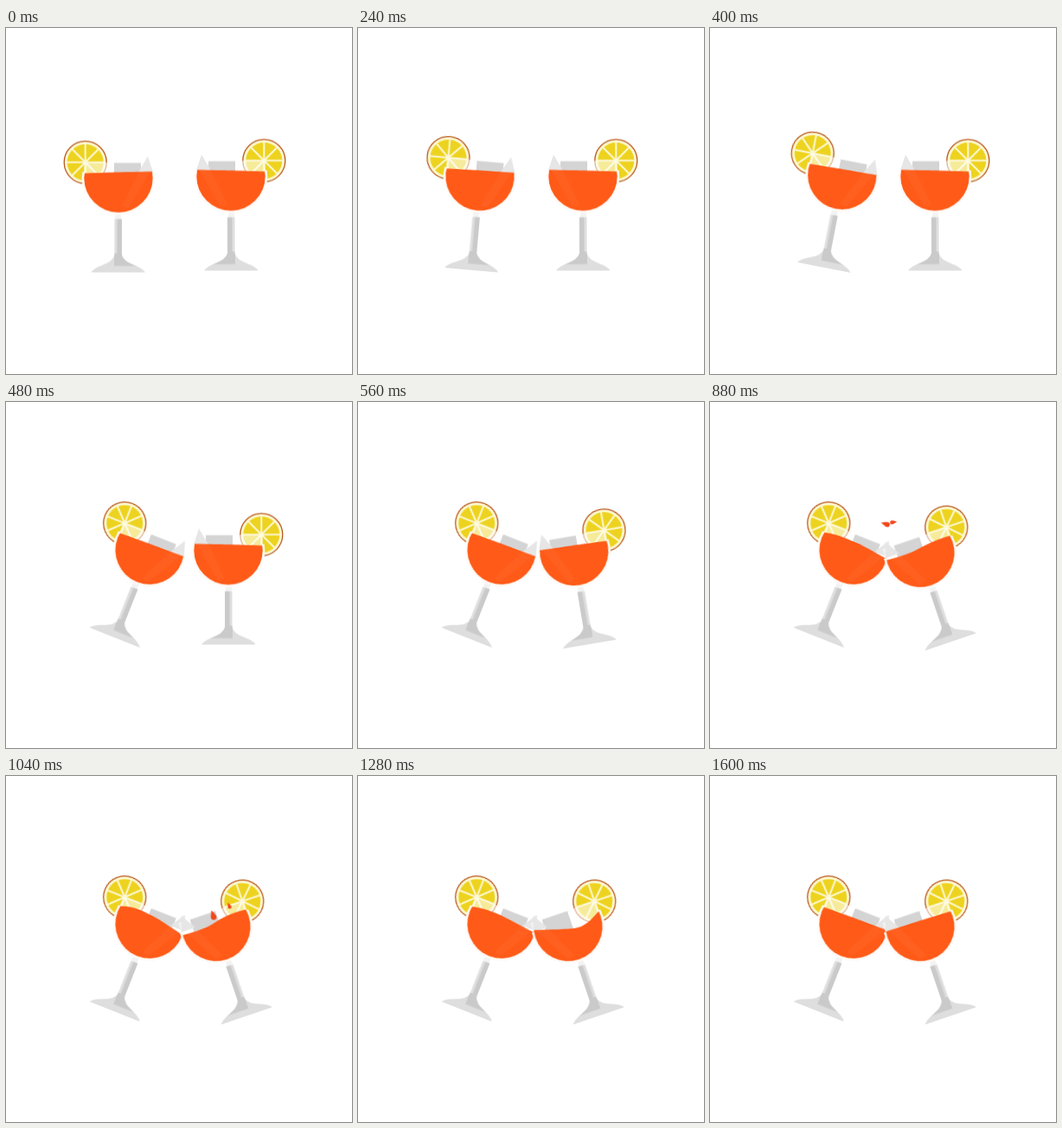
An HTML page without scripts that plays this animation: 400x400 px, repeating every 1.92 s.

```html
<!DOCTYPE html>
<html lang="en">
<head>
<meta charset="utf-8">
<title>Clinking glasses</title>
<style>
html, body { margin: 0; width: 100%; height: 100%; overflow: hidden; background: #fff; }
svg { display: block; width: 100%; height: 100%; }

.pose, .wave, .drop { animation: 1920ms step-end infinite; }
.wave { fill: #ff5a17; d: path("M-45 -60V-116.6C-25 -116.4 -10 -116 0 -115.8S25 -115 45 -114.4V-60Z"); }
.drop { fill: #f2471a; opacity: 0; }

#left { animation-name: lean-left; }
#right { animation-name: lean-right; }
#left .wave { animation-name: slosh-left; }
#right .wave { animation-name: slosh-right; }
#near { animation-name: fly-near; }
#far { animation-name: fly-far; }

/* each glass stands on the middle of its foot */
@keyframes lean-left {
  0% { transform: translate(130px, 282.5px) rotate(0deg); }
  8.33% { transform: translate(131px, 281px) rotate(2deg); }
  12.5% { transform: translate(131.5px, 280px) rotate(5deg); }
  16.66% { transform: translate(132px, 278.5px) rotate(8deg); }
  20.83% { transform: translate(132px, 277px) rotate(11deg); }
  25%, 100% { transform: translate(126px, 272.5px) rotate(21.6deg); }
}
@keyframes lean-right {
  0% { transform: translate(260px, 280.5px) rotate(0deg); }
  25% { transform: translate(257px, 280.5px) rotate(0deg); }
  29.16% { transform: translate(267.7px, 280px) rotate(-9.5deg); }
  33.33%, 100% { transform: translate(278px, 277.5px) rotate(-18.8deg); }
}

@keyframes slosh-left {
  37.5% { d: path("M-45 -60V-115C-25 -116 -10 -117 0 -117S25 -117 45 -114V-60Z"); }
  45.83% { d: path("M-45 -60V-113C-25 -115 -10 -118 0 -118S25 -120 45 -114V-60Z"); }
  54.16% { d: path("M-45 -60V-110C-30 -113 -12 -118 4 -119.3S30 -121 45 -113V-60Z"); }
  66.66% { d: path("M-45 -60V-113C-30 -114 -12 -117 4 -118S30 -118 45 -113.5V-60Z"); }
  75% { d: path("M-45 -60V-116.6C-25 -116.4 -10 -116 0 -115.8S25 -115 45 -114.4V-60Z"); }
}
@keyframes slosh-right {
  37.5% { d: path("M-45 -60V-116C-25 -115 -10 -115 0 -115S25 -116 45 -115V-60Z"); }
  45.83% { d: path("M-45 -60V-114C-25 -112 -12 -112 0 -114S25 -118 45 -116V-60Z"); }
  54.16% { d: path("M-45 -60V-112.5C-25 -111 -12 -111 0 -114S25 -119 45 -116V-60Z"); }
  58.33% { d: path("M-45 -60V-116C-25 -112 -12 -109 2 -110S28 -114 45 -117V-60Z"); }
  66.66% { d: path("M-45 -60V-120C-25 -114 -10 -109 4 -105.5S28 -108 45 -118V-60Z"); }
  75% { d: path("M-45 -60V-118C-25 -115 -8 -111 4 -111S28 -111 45 -116V-60Z"); }
  83.33% { d: path("M-45 -60V-116.6C-25 -116.4 -10 -116 0 -115.8S25 -115 45 -114.4V-60Z"); }
}

@keyframes fly-near {
  33.33% { opacity: 1; transform: translate(148px, 157px) rotate(50deg) scale(.55); }
  37.5% { opacity: 1; transform: translate(163px, 147px) rotate(50deg) scale(.7); }
  41.66% { opacity: 1; transform: translate(182px, 141px) rotate(70deg) scale(.8); }
  45.83% { opacity: 1; transform: translate(203px, 141px) rotate(-70deg) scale(.9); }
  50% { opacity: 1; transform: translate(222px, 148px) rotate(-40deg); }
  54.16% { opacity: 1; transform: translate(239.5px, 161px) rotate(-15deg); }
  58.33%, 100% { opacity: 0; }
}
@keyframes fly-far {
  33.33% { opacity: 1; transform: translate(153px, 176px) rotate(30deg) scale(.85); }
  37.5% { opacity: 1; transform: translate(170px, 157px) rotate(45deg) scale(.8); }
  41.66% { opacity: 1; transform: translate(190px, 145px) rotate(60deg) scale(.75); }
  45.83% { opacity: 1; transform: translate(212px, 139px) rotate(85deg) scale(.7); }
  50% { opacity: 1; transform: translate(236px, 141px) rotate(-50deg) scale(.65); }
  54.16% { opacity: 1; transform: translate(258px, 150px) rotate(-20deg) scale(.65); }
  58.33%, 100% { opacity: 0; }
}
</style>
</head>
<body>
<svg viewBox="0 0 400 400">
  <defs>
    <clipPath id="bowl"><circle cy="-109" r="39.7"/></clipPath>
    <path id="foot" d="M-31 0Q-28 -4.5 -19 -8Q-5.5 -13 -4 -20V-61.5H4.5V-20Q6 -13 19.5 -8Q29 -4.5 31.5 0Z"/>
    <clipPath id="footClip"><use href="#foot"/></clipPath>

    <g id="lemon">
      <circle r="24.5" fill="#fdf8d2" stroke="#b9581c" stroke-width="1.3"/>
      <circle r="21" fill="#edd31f"/>
      <path d="M0 -22V22M-22 0H22M-15.5 -15.5L15.5 15.5M-15.5 15.5L15.5 -15.5"
        stroke="#fdf8d2" stroke-width="2"/>
    </g>

    <g id="glass">
      <rect x="-3" y="-70" width="7" height="9" fill="#f3f3f3"/>
      <use href="#foot" fill="#dedede"/>
      <g clip-path="url(#footClip)" fill="#cacaca">
        <rect x="-23" y="-22" width="28" height="14.5"/>
        <rect x="-4" y="-62" width="5.5" height="45"/>
      </g>
      <use href="#lemon" x="38.3" y="-127.2"/>
      <path d="M-39.5 -127L-40.5 -109A40.5 40.5 0 0 0 40.5 -109L39.5 -127Z" fill="#fff" fill-opacity=".55"/>
      <circle cy="-109" r="40.9" fill="none" stroke="#fdfaf6" stroke-width="2.8"
        pathLength="360" stroke-dasharray="200 160" transform="rotate(-10 0 -109)"/>
      <rect x="-26" y="-126.5" width="31" height="30" fill="#d4d4d4"/>
      <path d="M-34 -134L-40 -116H-23Z" fill="#e6e6e6"/>
    </g>

    <path id="sheen" d="M-36 -116H-23L-4 -76L-12 -74Z" fill="#fff" fill-opacity=".04"/>
    <path id="tear" d="M-.5 -6Q4 1 3.2 3.5Q2 6 -.5 5.5Q-3.5 5 -3.2 1.5Z"/>
  </defs>

  <g id="left" class="pose">
    <g transform="scale(-1 1)">
      <use href="#glass"/>
      <g clip-path="url(#bowl)"><path class="wave"/></g>
      <use href="#sheen"/>
    </g>
  </g>
  <g id="right" class="pose">
    <use href="#glass"/>
    <g clip-path="url(#bowl)"><path class="wave"/></g>
    <use href="#sheen"/>
  </g>
  <use id="near" class="drop" href="#tear"/>
  <use id="far" class="drop" href="#tear"/>
</svg>
</body>
</html>
```
